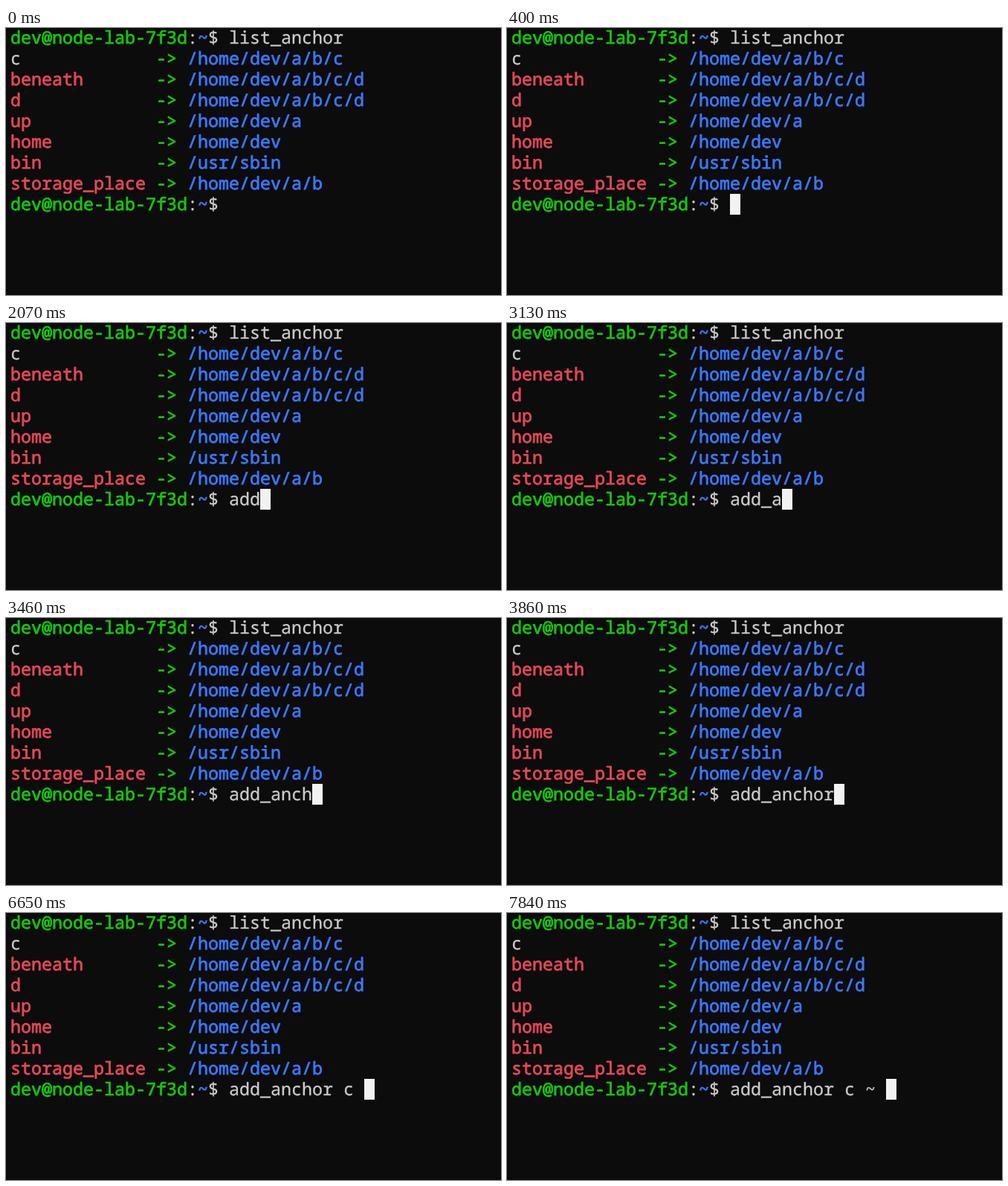
An HTML page for the animation above (8000 ms loop, 666 px wide and 359 px high).

```html
<!DOCTYPE html>
<html lang="en">
<head>
<meta charset="utf-8">
<title>Terminal</title>
<style>
  html, body { margin: 0; width: 100%; height: 100%; overflow: hidden; background: #0c0c0c; }
  svg { display: block; }
  text {
    font: 23.3333px "Noto Sans Mono", "DejaVu Sans Mono", monospace;
    font-variant-ligatures: none;
    text-rendering: geometricPrecision;
    white-space: pre;
    fill: #ccc;
    stroke: #ccc;
    stroke-width: 0.3px;
    stroke-linejoin: round;
  }
  /* Coloured text is semibold; a stroke gives a weight between regular and bold. */
  .red, .green, .blue { stroke-width: 0.8px; }
  .red { fill: #e74856; stroke: #e74856; }
  .green { fill: #16c60c; stroke: #16c60c; }
  .blue { fill: #3b78ff; stroke: #3b78ff; }
  .cover { fill: #0c0c0c; }
  .cursor { fill: #f2f2f2; animation: show 8s step-end infinite; }

  /* The cursor carries a cover that hides what is not typed yet. */
  .typing { animation: type 8s step-end infinite; }
  @keyframes show { 0% { opacity: 0; } 5%, 100% { opacity: 1; } }
  @keyframes type {
    0%      { transform: translateX(0); }
    20%     { transform: translateX(14px); }
    23.375% { transform: translateX(28px); }
    25.875% { transform: translateX(42px); }
    32.5%   { transform: translateX(56px); }
    39.125% { transform: translateX(70px); }
    39.875% { transform: translateX(84px); }
    42.375% { transform: translateX(98px); }
    43.25%  { transform: translateX(112px); }
    45.75%  { transform: translateX(126px); }
    48.25%  { transform: translateX(140px); }
    65.75%  { transform: translateX(154px); }
    69%     { transform: translateX(168px); }
    83.125% { transform: translateX(182px); }
    90.625% { transform: translateX(196px); }
    98%, 100% { transform: translateX(210px); }
  }
</style>
</head>
<body>
<svg width="666" height="359" viewBox="0 0 666 359">
  <rect class="cover" width="666" height="359"/>

  <text y="21"><tspan x="6" class="green">dev@node-lab-7f3d</tspan><tspan x="244">:</tspan><tspan x="258" class="blue">~</tspan><tspan x="272">$</tspan><tspan x="300">list_anchor</tspan></text>

  <text y="49"><tspan x="6">c</tspan><tspan x="202" class="green">-&gt;</tspan><tspan x="244" class="blue">/home/dev/a/b/c</tspan></text>
  <text y="77"><tspan x="6" class="red">beneath</tspan><tspan x="202" class="green">-&gt;</tspan><tspan x="244" class="blue">/home/dev/a/b/c/d</tspan></text>
  <text y="105"><tspan x="6" class="red">d</tspan><tspan x="202" class="green">-&gt;</tspan><tspan x="244" class="blue">/home/dev/a/b/c/d</tspan></text>
  <text y="133"><tspan x="6" class="red">up</tspan><tspan x="202" class="green">-&gt;</tspan><tspan x="244" class="blue">/home/dev/a</tspan></text>
  <text y="161"><tspan x="6" class="red">home</tspan><tspan x="202" class="green">-&gt;</tspan><tspan x="244" class="blue">/home/dev</tspan></text>
  <text y="189"><tspan x="6" class="red">bin</tspan><tspan x="202" class="green">-&gt;</tspan><tspan x="244" class="blue">/usr/sbin</tspan></text>
  <text y="217"><tspan x="6" class="red">storage_place</tspan><tspan x="202" class="green">-&gt;</tspan><tspan x="244" class="blue">/home/dev/a/b</tspan></text>

  <text y="245"><tspan x="6" class="green">dev@node-lab-7f3d</tspan><tspan x="244">:</tspan><tspan x="258" class="blue">~</tspan><tspan x="272">$</tspan><tspan x="300">add_anchor c ~</tspan></text>

  <g class="typing">
    <rect class="cover" x="300" y="223" width="366" height="30"/>
    <rect class="cursor" x="300" y="223" width="14" height="28"/>
  </g>
</svg>
</body>
</html>
```
